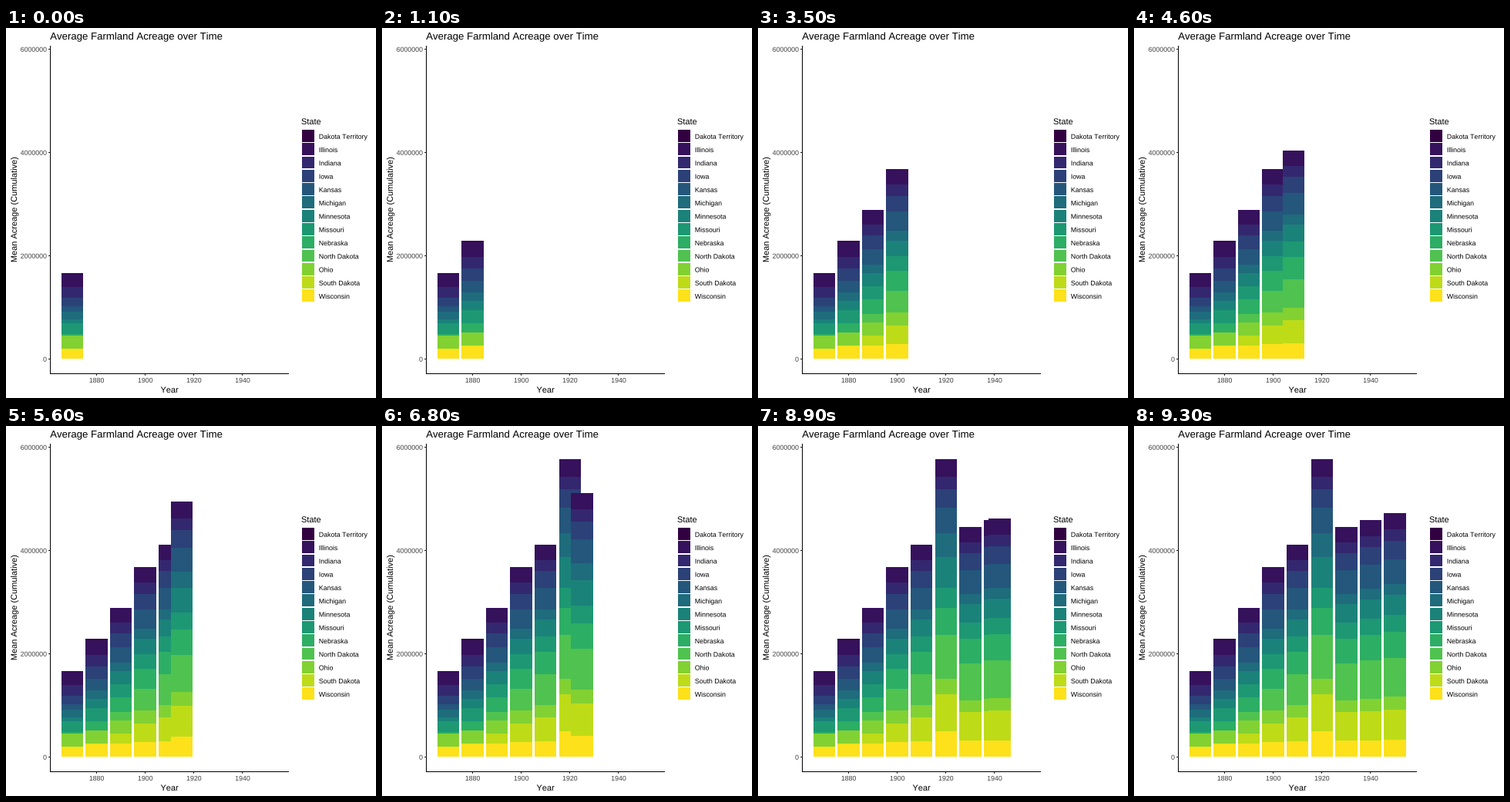
Recreate the animation shown at these times as a matplotlib script. Size 480 by 480 pixels, loop 10 s.

```python
import numpy as np
import matplotlib.pyplot as plt
from matplotlib.animation import FuncAnimation
from matplotlib.patches import PathPatch, Rectangle
from matplotlib.textpath import TextPath
from matplotlib.transforms import Affine2D

SIZE, DPI = 480, 100
FRAMES, INTERVAL = 100, 100

plt.rcParams["font.family"] = "Liberation Sans"
plt.rcParams["text.kerning_factor"] = 6  # evenly spaced, unkerned letters

# Segment height in pixels: at the start, when settled, and the extra in 1920.
# A negative start delays the year in which a state first shows up.
GROWTH = {
    "Dakota Territory": (0, 0, 0),
    "Illinois": (18, 20.5, 2.5),
    "Indiana": (14.5, 14.5, 2.5),
    "Iowa": (12, 23, 1),
    "Kansas": (7, 31, 3),
    "Michigan": (10, 13.5, 17),
    "Minnesota": (6, 25, 16),
    "Missouri": (14, 21, 5),
    "Nebraska": (2, 33, 3),
    "North Dakota": (-35, 49, 11),
    "Ohio": (18, 16, 4),
    "South Dakota": (-18, 38, 12),
    "Wisconsin": (14, 21, 12),
}
TOTALS = np.array([111, 153, 193, 246, 275, 386.3, 298.3, 307, 316])
YEARS = np.arange(1870, 1951, 10)
BASE = 429
LEFT, RIGHT, STEP = 71.65, 100.13, 31.58


def bar_heights():
    start, settled, extra = np.array(list(GROWTH.values())).T
    t = np.minimum((YEARS - 1870) / 60, 1)[:, None]
    ease = 1 - (1 - t) ** 2
    heights = np.maximum(start + (settled - start) * ease, 0)
    heights += extra * (YEARS == 1920)[:, None]
    # The territory grows until it is split in two
    heights[:, 0] = np.where(YEARS < 1890, (YEARS - 1860) / 10, 0)
    return heights * (TOTALS / heights.sum(axis=1))[:, None]


def palette(n):
    """Viridis as it looks in a slightly deeper RGB space."""
    linear = plt.cm.viridis(np.linspace(0, 1, n))[:, :3] ** 2.2
    mix = np.array([[0.975, 0.025, 0], [-0.04, 1.04, 0], [0, 0.005, 0.975]])
    return np.clip(linear @ mix.T, 0, 1) ** (1 / 1.8)


HEIGHTS = bar_heights()
PRESENT = HEIGHTS > 0
EDGES = BASE - TOTALS[:, None] + np.insert(HEIGHTS.cumsum(axis=1), 0, 0, axis=1)
COLORS = palette(len(GROWTH))

# First frame and length of each move to the next decade
MOVES = [(6 + 12 * i, 6) for i in range(6)] + [(78, 5), (89, 5)]

fig = plt.figure(figsize=(SIZE / DPI, SIZE / DPI), dpi=DPI, facecolor="white")
ax = fig.add_axes([0, 0, 1, 1])
ax.set_xlim(0, SIZE)
ax.set_ylim(SIZE, 0)
ax.axis("off")


def box(x0, y0, x1, y1, color, zorder=1):
    patch = Rectangle((x0, y0), x1 - x0, y1 - y0, facecolor=color,
                      linewidth=0, antialiased=False, zorder=zorder)
    return ax.add_patch(patch)


def label(x, y, text, px, color="black", align=0, angle=0):
    """Put text on a baseline; align 0, 0.5 or 1 for left, centre, right."""
    path = TextPath((0, 0), text, size=px)
    shift = -align * path.get_extents().x1
    place = Affine2D().translate(shift, 0).scale(1, -1)
    place.rotate_deg(-angle).translate(x, y)
    ax.add_patch(PathPatch(place.transform_path(path), facecolor=color,
                           linewidth=0, snap=False))


def draw_axes():
    text, tick = "#3f3f3f", "#262626"
    label(57.2, 15, "Average Farmland Acreage over Time", 13.2)
    label(212, 473, "Year", 11, align=0.5)
    label(14, 236, "Mean Acreage (Cumulative)", 11, align=0.5, angle=90)
    for i in range(4):
        y = 429 - 134 * i
        box(55, y, 57, y + 1, tick)
        label(52.6, y + 3.8, str(2000000 * i), 8.8, text, align=1)
        x = 117.4 + 63.14 * i
        box(int(x), 449, int(x) + 1, 451, tick)
        label(x, 460, str(1880 + 20 * i), 8.8, text, align=0.5)
    box(57, 23, 58, 449, "black")
    box(57, 448, 367, 449, "black")


def draw_legend():
    label(383, 125, "State", 11)
    for i, (state, color) in enumerate(zip(GROWTH, COLORS)):
        shift = 17.28 * i
        box(384, round(132.08 + shift), 400, round(147.9 + shift), color)
        label(405.8, 143.8 + shift, state, 8.8)


def make_bar(zorder):
    return [box(0, 0, 0, 0, c, zorder) for c in COLORS]


def place_bar(bar, pos, edges, shown):
    x0, x1 = round(LEFT + STEP * pos), round(RIGHT + STEP * pos)
    rows = np.rint(edges)
    for seg, top, bottom, show in zip(bar, rows, rows[1:], shown):
        seg.set_bounds(x0, top, x1 - x0, bottom - top)
        seg.set_visible(bool(show and bottom > top))


def hide(bar):
    for seg in bar:
        seg.set_visible(False)


def progress(frame):
    """Return the last decade reached and the fraction towards the next."""
    for done, (start, steps) in enumerate(MOVES):
        k = frame - start + 1
        if k < steps:
            return done, max(k, 0) / steps
    return len(MOVES), 0


draw_axes()
draw_legend()
still_bars = [make_bar(2) for _ in YEARS]
moving_bar = make_bar(3)


def update(frame):
    done, part = progress(frame)
    for i, bar in enumerate(still_bars):
        if i <= done:
            place_bar(bar, i, EDGES[i], PRESENT[i])
        else:
            hide(bar)
    if part > 0:
        # States found in only one of the two decades drop out while moving
        edges = EDGES[done] * (1 - part) + EDGES[done + 1] * part
        shown = PRESENT[done] & PRESENT[done + 1]
        place_bar(moving_bar, done + part, edges, shown)
    else:
        hide(moving_bar)
    return moving_bar


anim = FuncAnimation(fig, update, frames=FRAMES, interval=INTERVAL,
                     init_func=lambda: update(0), repeat=True,
                     repeat_delay=0, blit=False)
plt.show()
```
